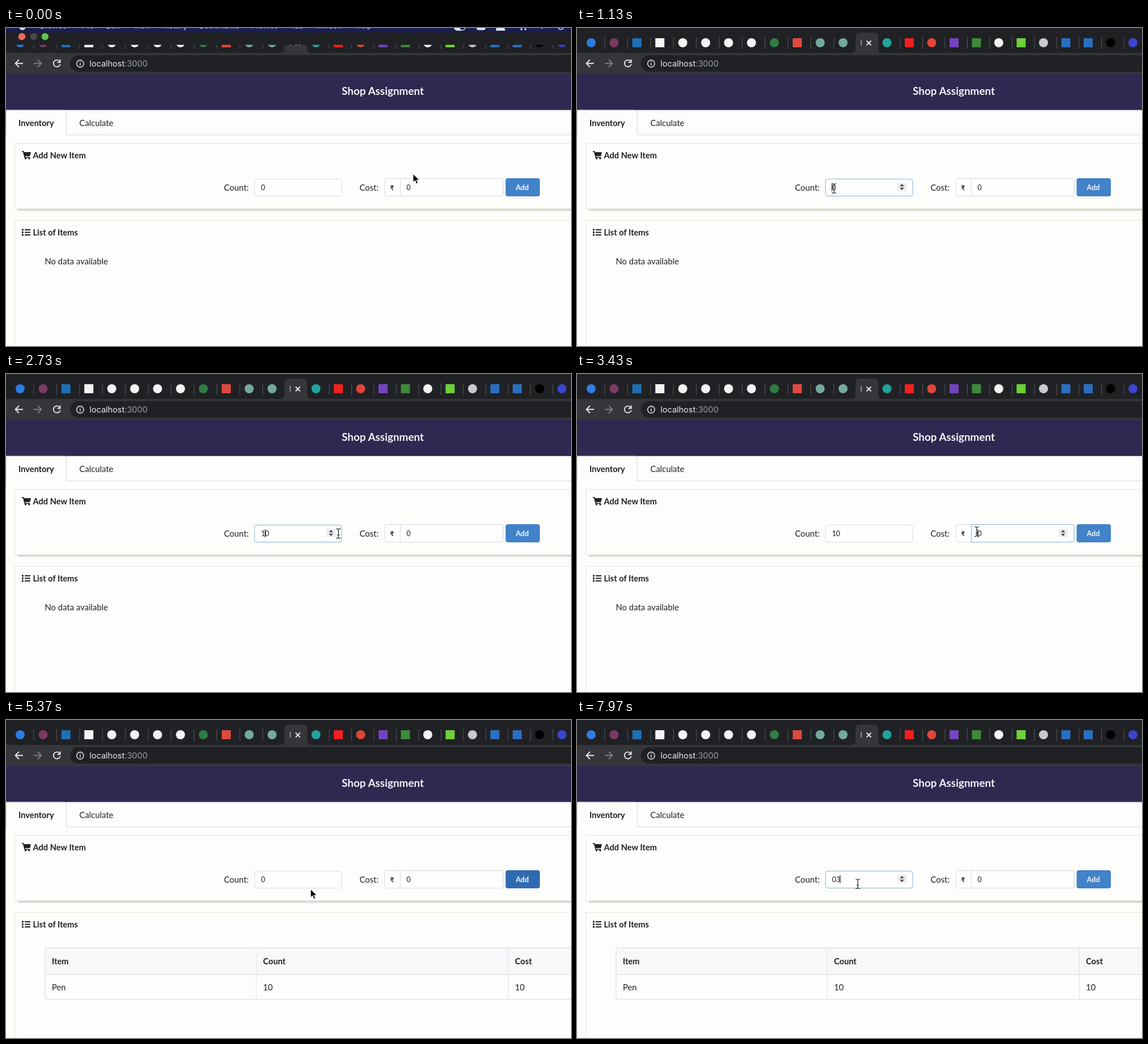
Animation of 998x561 px, one loop 8000 ms. Source, as an HTML page:

```html
<!DOCTYPE html>
<html lang="en">
<head>
<meta charset="utf-8">
<title>Shop Assignment</title>
<style>
  html, body { margin: 0; width: 100%; height: 100%; overflow: hidden; background: #fdfdfc; }
  svg { display: block; width: 100vw; height: 100vh; }
  text { font: 14.85px Lato, sans-serif; fill: #202124; }
  .bold { font-weight: 700; font-size: 14.65px; }
  .field { font-size: 12.4px; }
  .chrome { font: 14.5px Inter, sans-serif; fill: #e8eaed; }
  .menu { font: 13.4px Inter, sans-serif; fill: #e4e4ee; }
  .line { fill: none; stroke: #d6d7dc; }
  .panel { fill: #fdfdfb; stroke: #e2e5d5; }
  .input { fill: #fefefe; stroke: #d9dade; }
  .focus { stroke: #85b2d8; }
  .tool { fill: none; stroke: #e8eaed; stroke-width: 1.8; }
</style>
</head>
<body>
<svg viewBox="0 0 998 561" xmlns="http://www.w3.org/2000/svg">
  <defs>
    <filter id="blur" x="-5%" y="-200%" width="110%" height="500%"><feGaussianBlur stdDeviation="1.5"/></filter>
    <g id="spinner">
      <rect x="-8" y="-7" width="16" height="14" fill="#ececee"/>
      <path d="M-3.8-1.3L0-5.6L3.8-1.3ZM-3.8 1.3L0 5.6L3.8 1.3Z" fill="#4b4b4f"/>
    </g>
  </defs>

  <rect width="998" height="561" fill="#fdfdfc"/>

  <!-- browser -->
  <rect width="998" height="44" fill="#202124"/>
  <path d="M484 44Q492 44 492 36V16Q492 8 500 8H524Q532 8 532 16V36Q532 44 540 44Z" fill="#35363a"/>
  <g id="favicons"></g>
  <path d="M502 21V31" stroke="#b9bbc0" stroke-width="1.3"/>
  <path d="M511.5 22.5L519.5 30.5M519.5 22.5L511.5 30.5" class="tool"/>
  <rect y="44" width="998" height="37" fill="#35363a"/>
  <rect x="113" y="48" width="920" height="29" rx="14.5" fill="#202124"/>
  <path d="M30 62.5H17M23 56L16.5 62.5L23 69" class="tool"/>
  <path d="M49 62.5H62M56 56L62.5 62.5L56 69" class="tool" style="stroke:#7e8085"/>
  <path d="M94.6 58.7A6 6 0 1 0 95.7 64M95.8 55.5V60.5H90.8" class="tool"/>
  <circle cx="131" cy="62.8" r="6.2" class="tool" style="stroke-width:1.5"/>
  <path d="M131 61.8V66.3M131 59V60.5" class="tool" style="stroke-width:1.5"/>
  <text x="147.5" y="67.8" class="chrome">localhost<tspan fill="#9aa0a6">:3000</tspan></text>

  <!-- menu bar sliding out of view -->
  <g id="menubar">
    <rect y="-22" width="998" height="30" fill="#1b1d50"/>
    <rect y="8" width="998" height="22" fill="#202124"/>
    <circle cx="28" cy="15.5" r="6.2" fill="#ed6a5e"/>
    <circle cx="49" cy="15.5" r="6.2" fill="#47484c"/>
    <circle cx="69" cy="15.5" r="6.2" fill="#5fc454"/>
    <circle cx="29" cy="-2" r="6" fill="#e4e4ee"/>
    <g id="menuItems"></g>
    <g fill="#e4e4ee">
      <rect x="791" y="-8" width="21" height="13" rx="6.5"/>
      <circle cx="806" cy="-1" r="4.5" fill="#1b1d50"/>
      <rect x="831" y="-8" width="16" height="12" rx="4"/>
      <path d="M868-6H878L882 5H865Z"/>
      <path d="M907-5H920V0H909ZM909 1H912V4H909ZM916 1H919V4H916Z"/>
      <path d="M944-5L950-5L947 3Z"/>
      <circle cx="980" cy="-2" r="5" fill="none" stroke="#e4e4ee" stroke-width="1.5"/>
    </g>
  </g>

  <!-- page -->
  <rect y="81" width="998" height="63.7" fill="#2f2850"/>
  <text x="593" y="118.3" class="bold" style="font-size:18.9px;fill:#f3f2f6">Shop Assignment</text>
  <path d="M.5 189V145H103Q106.5 145 106.5 148.5V188.5H998" class="line"/>
  <text x="22" y="173" class="bold">Inventory</text>
  <text x="129.5" y="173">Calculate</text>

  <rect x="21" y="312" width="990" height="9.5" fill="#c3c5be" filter="url(#blur)"/>
  <rect x="15.5" y="203.5" width="1000" height="115.5" class="panel"/>
  <rect x="15.5" y="339.5" width="1000" height="240" class="panel"/>
  <g fill="#202124">
    <path d="M28 217H31.2L32 219H44L42.3 226H33.6L34 227.4H42V229H32.6L30 218.7H28Z"/>
    <circle cx="34.5" cy="230" r="1.7"/><circle cx="41" cy="230" r="1.7"/>
    <path d="M28 354.5H31V357.5H28ZM28 359H31V362H28ZM28 363.5H31V366.5H28ZM33 355H43V357H33ZM33 359.5H43V361.5H33ZM33 364H43V366H33Z"/>
  </g>
  <text x="47.5" y="229.5" class="bold">Add New Item</text>
  <text x="47.5" y="365.5" class="bold">List of Items</text>

  <text x="385" y="287">Count:</text>
  <rect id="countBox" x="439" y="266.5" width="154" height="30" rx="4" class="input"/>
  <text id="countText" x="450.4" y="286" class="field"></text>
  <use id="countSpinner" href="#spinner" x="574" y="280.5"/>

  <text x="624.5" y="287">Cost:</text>
  <rect x="669" y="265.5" width="209" height="31" rx="4" class="input"/>
  <text x="678.5" y="286" class="bold" style="font-size:11.5px">₹</text>
  <path id="costBox" d="M696.5 265.5H874Q878 265.5 878 269.5V292.5Q878 296.5 874 296.5H696.5Z" class="input"/>
  <text id="costText" x="707.6" y="286" class="field"></text>
  <use id="costSpinner" href="#spinner" x="858.5" y="280.5"/>

  <rect id="button" x="882.5" y="265" width="60.5" height="32" rx="4"/>
  <text x="900.5" y="286" class="bold" style="font-size:12.6px;fill:#f6f9fc">Add</text>
  <path id="caret" stroke="#202124" stroke-width="1.2"/>

  <text id="empty" x="68.5" y="416.5">No data available</text>
  <g id="table">
    <path d="M1010 402H73Q69 402 69 406V449H1010Z" fill="#f8f8fa"/>
    <path d="M1010 402H73Q69 402 69 406V489Q69 493 73 493H1010M69 449H1010" class="line"/>
    <path d="M442 402V493M887.5 402V493" class="line" style="stroke:#e0e1ea"/>
    <text x="81" y="431" class="bold">Item</text>
    <text x="454" y="431" class="bold">Count</text>
    <text x="899" y="431" class="bold">Cost</text>
    <text x="81" y="477">Pen</text>
    <text x="454" y="477">10</text>
    <text x="899" y="477">10</text>
  </g>

  <g id="pointer">
    <path id="arrow" d="M0 0V15.5L3.6 12.2L6.1 18L8.9 16.8L6.4 11.2H11.2Z" fill="#000" stroke="#fff" stroke-width="1.1"/>
    <g id="beam" fill="none">
      <path d="M-4-8.5Q0-8.5 0-6Q0-8.5 4-8.5M0-6V6M-4 8.5Q0 8.5 0 6Q0 8.5 4 8.5M-2 2.5H2" stroke="#fff" stroke-width="2.6" opacity=".6"/>
      <path d="M-4-8.5Q0-8.5 0-6Q0-8.5 4-8.5M0-6V6M-4 8.5Q0 8.5 0 6Q0 8.5 4 8.5M-2 2.5H2" stroke="#222" stroke-width="1.2"/>
    </g>
    <g id="hand" transform="translate(.5 0) scale(1.08)" stroke="#000" stroke-linejoin="round">
      <path d="M-3.5-7Q-2-8.8-.7-7L.5-2Q2-3.6 3.2-1.7Q5-2.7 5.8-.8Q7.5-1.2 7.4 1.2L6.6 5.2L5.3 9H-1.8L-5.2 4.2Q-7 1.5-5.3 1.1L-2.4 3.2Z" fill="#fff"/>
      <path d="M0 3V6.5M2.2 3V6.5M4.4 3V6.5" fill="none" stroke-width=".8"/>
    </g>
  </g>
</svg>

<script>
const $ = id => document.getElementById(id);
const LOOP = 8000;

function add(parent, tag, attrs, text = "") {
  const node = document.createElementNS("http://www.w3.org/2000/svg", tag);
  for (const key in attrs) node.setAttribute(key, attrs[key]);
  node.textContent = text;
  parent.append(node);
}

// Favicons: "o" is a circle, "s" a square; the active tab has none.
const favicons = ("o2f7be0 o7b3b63 s1f6fb5 sf4f4f4 of4f4f4 of4f4f4 of4f4f4 of4f4f4 o2f7d43 sde4a3f o74aa9c o74aa9c - " +
  "o20a49e sf02020 oe0453a s7344c0 s3d8a38 of4f4f4 s6fd03a oc9c9cb s2a6fc0 s2a6fc0 o000000 o3b45d0").split(" ");
favicons.forEach((icon, i) => {
  const x = i < 12 ? 25 + i * 40.45 : 508 + (i - 12) * 39.5;
  const fill = "#" + icon.slice(1);
  if (icon[0] === "o") add($("favicons"), "circle", { cx: x, cy: 26, r: 8, fill });
  if (icon[0] === "s") add($("favicons"), "rect", { x: x - 8, y: 18, width: 16, height: 16, fill });
  if (i !== 11 && i !== 12) add($("favicons"), "rect", { x: x + (i < 12 ? 23.5 : 23), y: 16, width: 1, height: 21, fill: "#55575c" });
});

Object.entries({ Browse: 60, File: 133, Edit: 176, View: 225, History: 275, Bookmarks: 341,
  Profiles: 433, Tab: 502, Window: 545, Help: 617 }).forEach(([label, x], i) =>
  add($("menuItems"), "text", { x, y: 1.5, class: "menu", "font-weight": i ? 400 : 700 }, label));

// Pointer path: time, x, y
const path = [
  [0, 719, 257], [560, 471, 289], [630, 468, 288], [860, 454, 283],
  [2450, 454, 283], [3000, 712, 280], [3400, 706, 278],
  [3800, 706, 278], [4050, 872, 284], [4200, 899, 289],
  [4900, 899, 289], [5370, 538, 298], [5690, 400, 272], [5900, 330, 270],
  [6250, 330, 270], [6500, 453, 281], [6650, 453, 281], [7200, 496, 289], [LOOP, 496, 289]
];

// Field state from each moment on; caret counts the digits before it.
const states = [
  { at: 0, count: "0", cost: "0" },
  { at: 1000, focus: "count", caret: 0, count: "0", cost: "0" },
  { at: 1700, focus: "count", caret: 1, count: "10", cost: "0" },
  { at: 3130, focus: "cost", caret: 0, count: "10", cost: "0" },
  { at: 3600, focus: "cost", caret: 1, count: "10", cost: "10" },
  { at: 4440, focus: "button", count: "10", cost: "10" },
  { at: 4540, focus: "button", count: "0", cost: "0" },
  { at: 7000, focus: "count", caret: 1, count: "0", cost: "0" },
  { at: 7650, focus: "count", caret: 2, count: "03", cost: "0" }
];

const between = (t, a, b) => t >= a && t < b;
const show = (id, on) => $(id).setAttribute("visibility", on ? "visible" : "hidden");

function pointerAt(t) {
  const i = path.findIndex(p => p[0] > t);
  const [t0, x0, y0] = path[i - 1], [t1, x1, y1] = path[i];
  const u = (t - t0) / (t1 - t0), k = u * u * (3 - 2 * u);
  return [x0 + (x1 - x0) * k, y0 + (y1 - y0) * k];
}

function draw(t) {
  const slide = 1 - (1 - Math.min(t / 220, 1)) ** 2;
  $("menubar").setAttribute("transform", `translate(0 ${-31 * slide})`);

  const [x, y] = pointerAt(t);
  const inRow = between(y, 265, 297);
  const over = inRow && between(x, 439, 593) ? "count"
    : inRow && between(x, 697, 878) ? "cost"
    : inRow && between(x, 882, 943) ? "button" : "";
  const typing = between(t, 1700, 2450) || between(t, 3600, 3800) || between(t, 7650, 7900);
  $("pointer").setAttribute("transform", `translate(${x} ${y})`);
  show("arrow", !over);
  show("beam", !typing && (over === "count" || over === "cost"));
  show("hand", over === "button");

  const state = states.findLast(s => s.at <= t);
  for (const name of ["count", "cost"]) {
    const focused = state.focus === name;
    $(name + "Text").textContent = state[name];
    $(name + "Box").classList.toggle("focus", focused);
    show(name + "Spinner", focused || over === name);
  }

  show("caret", state.caret !== undefined && (t - state.at) % 1000 < 500);
  if (state.caret !== undefined) {
    const left = +$(state.focus + "Text").getAttribute("x") + state.caret * 7.2;
    $("caret").setAttribute("d", `M${left} 274V288`);
  }

  const pressed = between(t, 4440, 4640);
  const lit = over === "button" || state.focus === "button";
  $("button").setAttribute("fill", pressed ? "#2e639f" : lit ? "#306bb2" : "#4182c9");

  const filled = t >= 4700;
  show("table", filled);
  show("empty", !filled);
}

function frame() {
  draw(performance.now() % LOOP);
  requestAnimationFrame(frame);
}
frame();
</script>
</body>
</html>
```
